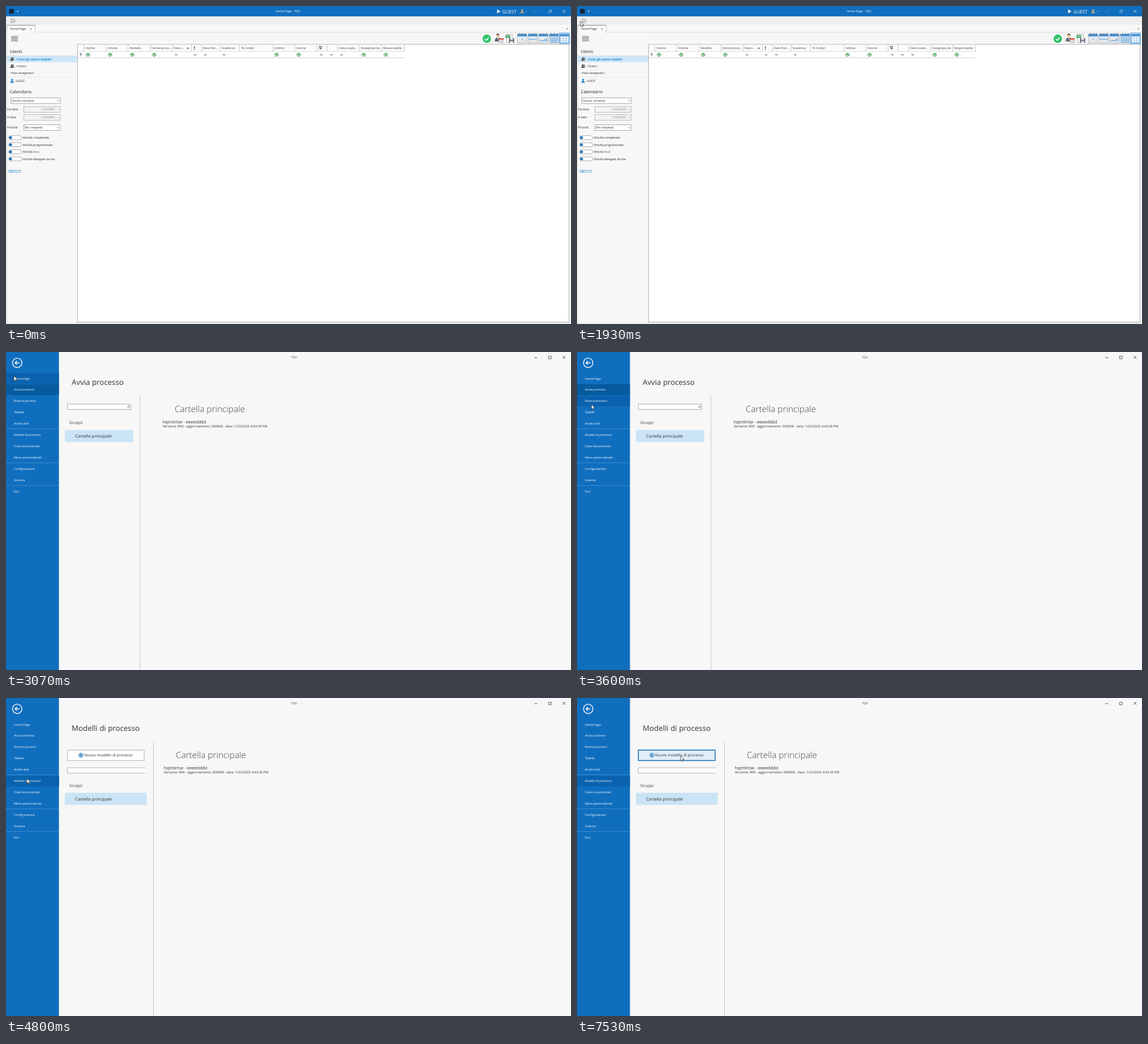
Animation of 998x561 px, one loop 8 s. Source, as an HTML page:

```html
<!DOCTYPE html>
<html lang="it">
<head>
<meta charset="utf-8">
<title>Home Page</title>
<style>
html, body { margin: 0; width: 100%; height: 100%; overflow: hidden; background: #f7f7f7; }
svg { display: block; width: 998px; height: 561px; }
text { font-family: "Open Sans", "Noto Sans", sans-serif; text-rendering: geometricPrecision; white-space: pre; }
</style>
</head>
<body>
<svg id="stage" viewBox="0 0 998 561"></svg>
<script>
const BLUE = '#106ebe', DARK = '#262626', LINE = '#c0c0c0', GREEN = '#2f9a48', SKY = '#4791d3';
const LOOP = 8000;
const APP = 'TQH', USER = 'GUEST', ENTRY = 'hqtmlrtse - eeeedddd';

const esc = s => s.replace(/&/g, '&amp;').replace(/</g, '&lt;').replace(/>/g, '&gt;');
const rect = (x, y, w, h, fill, more = '') => `<rect x="${x}" y="${y}" width="${w}" height="${h}" fill="${fill}" ${more}/>`;
const circle = (x, y, r, fill, more = '') => `<circle cx="${x}" cy="${y}" r="${r}" fill="${fill}" ${more}/>`;
const fillPath = (d, fill, more = '') => `<path d="${d}" fill="${fill}" ${more}/>`;
const stroke = (d, color, w = 1, more = '') => `<path d="${d}" fill="none" stroke="${color}" stroke-width="${w}" ${more}/>`;
const group = (id, body, more = '') => `<g id="${id}" ${more}>${body}</g>`;
const at = (x, y, body) => `<g transform="translate(${x} ${y})">${body}</g>`;
// y is the middle of the text line
const text = (x, y, s, size = 5.3, fill = DARK, more = '') =>
  `<text x="${x}" y="${(y + size * .36).toFixed(2)}" font-size="${size}" fill="${fill}" ${more}>${esc(s)}</text>`;

function windowButtons(min, max, color, restored) {
  const box = restored
    ? stroke('M958.8 8.3h3.6v3.6h-3.6zM960 8.3v-1.4h3.6v3.6h-1.2', max, .7)
    : stroke('M958.4 7.4h4.6v4.6h-4.6z', max, .8);
  return stroke('M933.4 10h4.8', min, .9) + box + stroke('M983.3 7l4.8 4.8m0-4.8l-4.8 4.8', color, .9);
}

const person = (color, s = 1) => `<g transform="scale(${s})">` +
  circle(0, -1.8, 1.9, color) + fillPath('M-3.3 3.8C-3.3 1-2 .2 0 .2S3.3 1 3.3 3.8z', color) + '</g>';
const people = y => at(12.6, y - .3, person('#777', .7)) + at(10, y, person('#444', .8));

function calendar(x, marks) {
  let s = rect(x, 49.5, 16.4, 16, '#fff', 'stroke="#8f959c" stroke-width=".7"') + rect(x, 49.2, 16.4, 4.6, SKY);
  for (const k of [3, 8, 13]) s += rect(x + k, 48, 1, 2.8, '#5b6675');
  for (let r = 0; r < 4; r++)
    for (let c = 0; c < 5; c++)
      s += rect(x + 1.3 + c * 2.9, 55.3 + r * 2.5, 2.2, 1.7, marks(r, c) ? SKY : '#ccd1d7');
  return s;
}

function combo(x, y, w, h, s, off) {
  return rect(x + .5, y + .5, w, h, off ? '#f3f3f3' : '#fff', `stroke="${off ? '#b4b4b4' : '#9c9c9c'}" stroke-width=".9"`) +
    text(off ? x + w - 9 : x + 2, y + h / 2 + .5, s, 5.3, off ? '#777' : DARK, off ? 'text-anchor="end"' : '') +
    fillPath(`M${x + w - 5} ${y + h / 2}h3l-1.5 1.7z`, off ? '#aaa' : '#666');
}

function sidePanel() {
  let s = rect(1, 47, 125, 512, '#f7f7f7');
  for (let i = 0; i < 4; i++) s += rect(9, 53.2 + i * 2.6, 12.2, 1.1, '#666');
  s += text(6.7, 80.5, 'Utenti', 7.6) + rect(1, 87.4, 124.5, 12, '#cde6f7');
  s += people(93.5) + text(17.8, 93.6, '<Tutti gli utenti visibili>', 5.4, '#1b8ad0', 'font-weight="700"');
  s += people(106) + text(17.3, 106, '<Tutto>', 5.4) + text(7, 118.5, '<Non assegnato>');
  s += rect(1, 125, 124.5, .7, '#e2e2e2') + at(10.8, 132, person('#1f86cf', .95)) + text(17, 132.5, USER, 5.2);
  s += text(6.7, 151.5, 'Calendario', 7.7);
  s += combo(8, 161.5, 87.5, 10, 'Giorno corrente');
  s += text(2, 182.5, 'Da data') + combo(31, 177, 64.5, 10, '1/23/2025', true);
  s += text(2, 196.5, 'A data') + combo(31, 191, 64.5, 10, '1/23/2025', true);
  s += text(2, 214.5, 'Priorità') + combo(31, 209, 64.5, 10, '(No sospese)');
  ['completate', 'programmate', 'in cc', 'delegate da me'].forEach((w, i) => {
    const y = 232.3 + i * 12.45;
    s += rect(4.6, y - 3.6, 23, 7.2, '#fff', 'rx="3.6" stroke="#999" stroke-width=".8"') +
      circle(8, y, 2.5, BLUE) + text(29.5, y, 'Attività ' + w);
  });
  return s + text(4, 290.5, 'Aggiorna', 5.4, '#1b80c4', 'text-decoration="underline"');
}

function grid() {
  const heads = [[140, 'Utente'], [179.3, 'Attività'], [218.3, 'Modello'], [257, 'Nome proce...'], [296, 'Data i...'],
    [347.5, 'Data fine ...'], [380.7, 'Scadenza'], [416, '% Compl'], [474, 'Ambito'], [513, 'Azione'],
    [588, 'Data scade...'], [627, 'Assegnata da'], [666, 'Responsabile']];
  const cols = [137.5, 176.5, 215.5, 254.5, 293.5, 327.5, 345.5, 378.5, 412.5, 471.5, 510.5, 549.5, 567.5, 585.5, 624.5, 663.5, 703.5];
  let s = rect(126.3, 67.8, 868.3, 489.8, '#fff', 'stroke="#a6a6a6" stroke-width=".9"') + rect(127, 68.4, 577, 11.6, '#fbfbfb');
  for (const x of cols) s += stroke(`M${x} 68.5v11.5`, LINE, .9);
  s += stroke('M127 80.3h577', '#d0d0d0', .8) + stroke('M127 91.3h577', LINE, .8);
  for (const [x, w] of heads) s += text(x, 74.2, w, 5.35, '#444');
  s += fillPath('M318.8 75.4h4.6l-2.3-2.9z', '#666');
  s += text(331.6, 73.8, '!', 8, '#222', 'font-weight="700"');
  s += stroke('M553 71.3h4.8l-1.8 1.8 1.8 1.8h-3M553.1 71.2l2.3 5.8', '#333', .9);
  s += fillPath('M129.7 83.8h4.6l-1.8 2.2v2.4h-1V86z', '#666');
  for (const x of [145, 184, 223, 262, 478, 517, 632, 671])
    s += at(x - .2, 86, rect(-2, -3, 3.9, 6, GREEN) + text(-1.5, 0, 'B', 4.4, '#fff', 'font-weight="700"') +
      stroke('M-3.9-1.2l1 1.2-1 1.2M3.8-1.4C2.4-1.6 2.4 1.6 3.8 1.4', '#3d6b48', .9));
  for (const x of [300.5, 334, 352, 385.3, 556.8, 574.8, 592.8])
    s += stroke(`M${x - 2.2} 85.3h4.4m-4.4 1.5h4.4`, '#777', .8);
  return s;
}

function toolbar() {
  let s = circle(849.3, 57.7, 7.4, '#2fc26b') + stroke('M845.8 58l2.5 2.6 4.5-5', '#fff', 1.6);
  s += at(868.8, 54, circle(0, -2.2, 2.8, '#e8b98c') + fillPath('M-2.9-2.4C-3-6.5 3-6.5 2.9-2.4 1.5-4-1.5-4-2.9-2.4z', '#5b4a3f') +
    fillPath('M-5.3 8.4C-5.3 3-3 1.6 0 1.6S5.3 3 5.3 8.4z', '#56616e') + fillPath('M-1.2 1.6h2.4L0 6z', '#fff'));
  s += rect(870.6, 57.5, 8.2, 7.6, '#fff', 'stroke="#999" stroke-width=".6"') + rect(870.4, 57, 8.6, 2.4, '#d8483c');
  for (let i = 0; i < 6; i++) s += rect(871.8 + i % 3 * 2.2, 60.6 + (i / 3 | 0) * 2, 1.4, 1.2, '#8b96a3');
  s += rect(884.5, 50, 9.6, 14, '#fff', 'stroke="#888" stroke-width=".7"') + rect(882.3, 51.5, 8.4, 4.8, GREEN);
  s += text(883.4, 54, 'XLS', 3.4, '#fff', 'font-weight="700"');
  s += rect(888.8, 56.8, 8.6, 8.2, '#475260') + rect(890.7, 57, 4.8, 2.8, '#fff') + rect(890.4, 61.4, 5.4, 3.6, '#dfe4e9');
  s += stroke('M860.5 49v17M900 49v17', '#dcdcdc', .7);
  s += calendar(903.6, (r, c) => r === 1 && c === 2) + calendar(922.3, r => r === 1);
  s += calendar(941, (r, c) => r === 2 || r === 1 && c > 2) + calendar(959.8, () => true);
  s += rect(977.5, 47.7, 18, 19, '#a9d3f2', 'stroke="#6bb1e4" stroke-width=".9"') + rect(979, 50, 15.2, 14.6, '#fff', `stroke="${SKY}" stroke-width=".8"`);
  s += rect(979, 50, 15.2, 3.6, SKY) + stroke('M979 57.2h15.2m-15.2 3.7h15.2M984.1 53.6v11m5-11v11', '#7db3de', .7);
  return s;
}

function homePage() {
  let s = rect(0, 0, 998, 561, '#f7f7f7') + rect(0, 18, 998, 15, '#f0eff0') + rect(0, 0, 998, 18.3, BLUE);
  s += rect(5.5, 5.2, 8.2, 8.2, '#14243a') + fillPath('M18.8 8.8h3.6l-1.8 2z', '#fff');
  s += text(498, 9.5, `Home Page - ${APP}`, 5.3, '#fff', 'text-anchor="middle"');
  s += fillPath('M867.6 6l5.8 3.5-5.8 3.5z', '#fff') + text(876.7, 9.9, USER, 8, '#fff');
  s += at(911.7, 9, person('#c6ab78', .95)) + stroke('M917.4 8.6l1.8 1.7 1.8-1.7', '#a9b59a', .7);
  s += windowButtons('#5f9fd6', '#9cc5e8', '#cfe2f3', true);
  s += rect(8.7, 22.8, 6.2, 6.6, 'none', 'stroke="#999" stroke-width=".8"') + stroke('M10 24.8h3.6m-3.6 1.6h3.6m-3.6 1.6h3.6', '#999', .6) + fillPath('M15.8 25.6h2.8l-1.4 1.5z', '#888');
  s += stroke('M52 46.8h943', '#d8d8d8', .8) + rect(1.5, 34, 50.2, 13.4, '#fafafa') + stroke('M1.5 47v-13h50.2v13', '#b8b8b8', .8) + rect(1.5, 33.5, 50.2, 1, '#9a9a9a');
  s += text(7, 40.3, 'Home Page', 5.25) + stroke('M42.6 39.2l3 3m0-3l-3 3', '#777', .7) + fillPath('M990 39.4h3.4l-1.7 1.8z', '#666');
  return s + sidePanel() + toolbar() + grid() + stroke('M1.2 47v512.4h995', '#d4d4d4', .8);
}

const ITEMS = ['Home Page', 'Avvia processo', 'Ricerca processi', 'Tabelle', 'Analisi dati', 'Modelli di processo',
  'Classi documentali', 'Menu personalizzati', 'Configurazione', 'Sistema', 'Esci'];
const PITCH = 19.9;
const rowTop = i => Math.round(37 + i * PITCH);

function sidebar() {
  let s = rect(-100, 0, 193.5, 561, BLUE) + rect(0, 0, 93.5, 19, BLUE, 'id="hover"') + rect(0, 0, 93.5, 19, BLUE, 'id="picked"');
  for (const y of [135.5, 195.5, 235.5]) s += stroke(`M0 ${y}h93`, '#4a94d2', .8);
  s += circle(19.8, 19.2, 8.3, 'none', 'stroke="#fff" stroke-width="1.3"') + stroke('M24 19.2h-8.2m3.5-3.4l-3.5 3.4 3.5 3.4', '#fff', 1.4);
  ITEMS.forEach((w, i) => s += text(14, 46.7 + i * PITCH, w, 5.25, '#fff', 'font-weight="500"'));
  return s;
}

const heading = s => text(116, 53, s, 13.3, '#333');
const label = y => text(111.7, y, 'Gruppi', 7.3, '#444');
const search = rect(108.4, 91.9, 111.8, 9.6, '#fff', 'stroke="#9a9a9a" stroke-width=".8"') +
  circle(217, 96, 1.5, 'none', 'stroke="#666" stroke-width=".7"') + stroke('M216 97.2l-2 2', '#666', .8);
const divider = x => stroke(`M${x} 77v484`, LINE, .9);
const folder = (y, w) => rect(104, y, w, 21.3, '#cbe4f5') + text(122, y + 10.9, 'Cartella principale', 7.7, '#333');
const details = x => text(x + 21.2, 100.3, 'Cartella principale', 15.4, '#444', 'font-weight="300"') +
  text(x, 122.8, ENTRY, 7.6, '#333') +
  text(x, 131.4, 'Versione: R00 - aggiornamento: 000008 - data: 1/22/2025 4:43:30 PM', 5.8, '#333');

const newButton = rect(108.4, 91.9, 135.6, 18.4, '#fff', 'id="button" stroke="#a5a5a5" stroke-width=".9"') +
  circle(132.3, 101, 4.2, '#4f93cc') + circle(132.3, 101, 3, '#b9d8ef') + stroke('M132.3 98.8v4.4m-2.2-2.2h4.4', '#1f6fb3', 1.2) +
  text(138, 101, 'Nuovo modello di processo', 6.75, '#333');
const openSearch = rect(108, 122.6, 137.6, 10.4, '#fff') + stroke('M245.6 123h-137.2v9.7h137.2', '#a0a0a0', .8);

const stage = document.getElementById('stage');
stage.innerHTML =
  group('home', homePage()) +
  group('back',
    rect(0, 0, 998, 561, '#f7f7f7') + windowButtons('#333', '#333', '#333') +
    text(508.5, 9.5, APP, 5.2, '#444', 'id="caption" text-anchor="middle"') +
    group('start',
      group('startLeft', heading('Avvia processo') + search + label(124.5) + folder(137.6, 120.5) + divider(236.5)) +
      group('startRight', details(276.7))) +
    group('models', heading('Modelli di processo') + divider(260.5) +
      group('partial', search + label(124.7) + label(154.3) + stroke('M107 138h118', '#a9c4de', .9) + stroke('M236.5 92v18.5m0 10.5v17.5', LINE, .9)) +
      group('full', newButton + openSearch + label(154.3) + folder(167.2, 144.6) + details(278.7))) +
    group('side', sidebar())) +
  group('cursor', fillPath('M0 0V8.7L2 6.9 3.4 10 4.8 9.4 3.5 6.5H6.1z', '#fff', 'stroke="#222" stroke-width=".7" stroke-linejoin="round"'));

const el = {};
for (const n of stage.querySelectorAll('[id]')) el[n.id] = n;
const set = (id, attrs) => { for (const k in attrs) el[id].setAttribute(k, attrs[k]); };
const show = (id, on) => set(id, { display: on ? 'inline' : 'none' });
const clamp = v => Math.max(0, Math.min(1, v));

// pointer path: time, x, y
const PATH = [[0, 352, 564], [270, 352, 564], [700, 232, 408], [1100, 64, 173], [1930, 6, 27], [2540, 6, 27], [3060, 14, 42],
  [3200, 14, 42], [4000, 37, 142], [5130, 37, 142], [5400, 34, 145], [5800, 34, 145], [6200, 116, 139.5],
  [6600, 162, 114], [7470, 183, 102], [LOOP, 183, 102]];

const slope = (i, k) => (PATH[i + 1][k] - PATH[i][k]) / (PATH[i + 1][0] - PATH[i][0]);
function tangent(i, k) {
  if (i === 0 || i === PATH.length - 1) return 0;
  const a = slope(i - 1, k), b = slope(i, k);
  return a * b > 0 ? 2 * a * b / (a + b) : 0;
}
function pointer(t, k) {
  let i = 0;
  while (i < PATH.length - 2 && t >= PATH[i + 1][0]) i++;
  const h = PATH[i + 1][0] - PATH[i][0], u = (t - PATH[i][0]) / h, v = 1 - u;
  return PATH[i][k] * (1 + 2 * u) * v * v + PATH[i + 1][k] * u * u * (3 - 2 * u) +
    h * (tangent(i, k) * u * v * v - tangent(i + 1, k) * u * u * v);
}

function draw(t) {
  const x = pointer(t, 1), y = pointer(t, 2);
  const open = t >= 2330, models = t >= 4270, full = t >= 4400;
  set('cursor', { transform: `translate(${x.toFixed(2)} ${y.toFixed(2)})` });
  show('home', !open);
  show('back', open);
  if (!open) return;

  const slide = -93 * (1 - clamp((t - 2330) / 376)) ** 2;
  const shift = dx => `translate(${dx.toFixed(2)} 0)`;
  set('side', { transform: shift(slide) });
  set('startLeft', { transform: shift(slide) });
  set('startRight', { transform: shift(slide * 2.1) });
  set('start', { opacity: clamp((t - 2486) / 200) });
  show('caption', t >= 2700);
  show('start', !models);
  show('models', models);
  show('partial', !full);
  show('full', full);

  const row = Math.floor((y - 37) / PITCH);
  show('hover', x < 93 && row >= 0);
  set('hover', { y: rowTop(Math.max(row, 0)), fill: '#0a62ae' });
  set('picked', { y: rowTop(full ? 5 : 1), fill: full ? '#0a62ae' : '#075a9e' });

  const over = full && x > 108 && y < 110;
  set('button', { fill: over ? '#e2eef8' : '#fff', stroke: over ? '#1d74b8' : '#a5a5a5', 'stroke-width': over ? 1.6 : .9 });
}

function tick() {
  draw(performance.now() % LOOP);
  requestAnimationFrame(tick);
}
tick();
</script>
</body>
</html>
```
